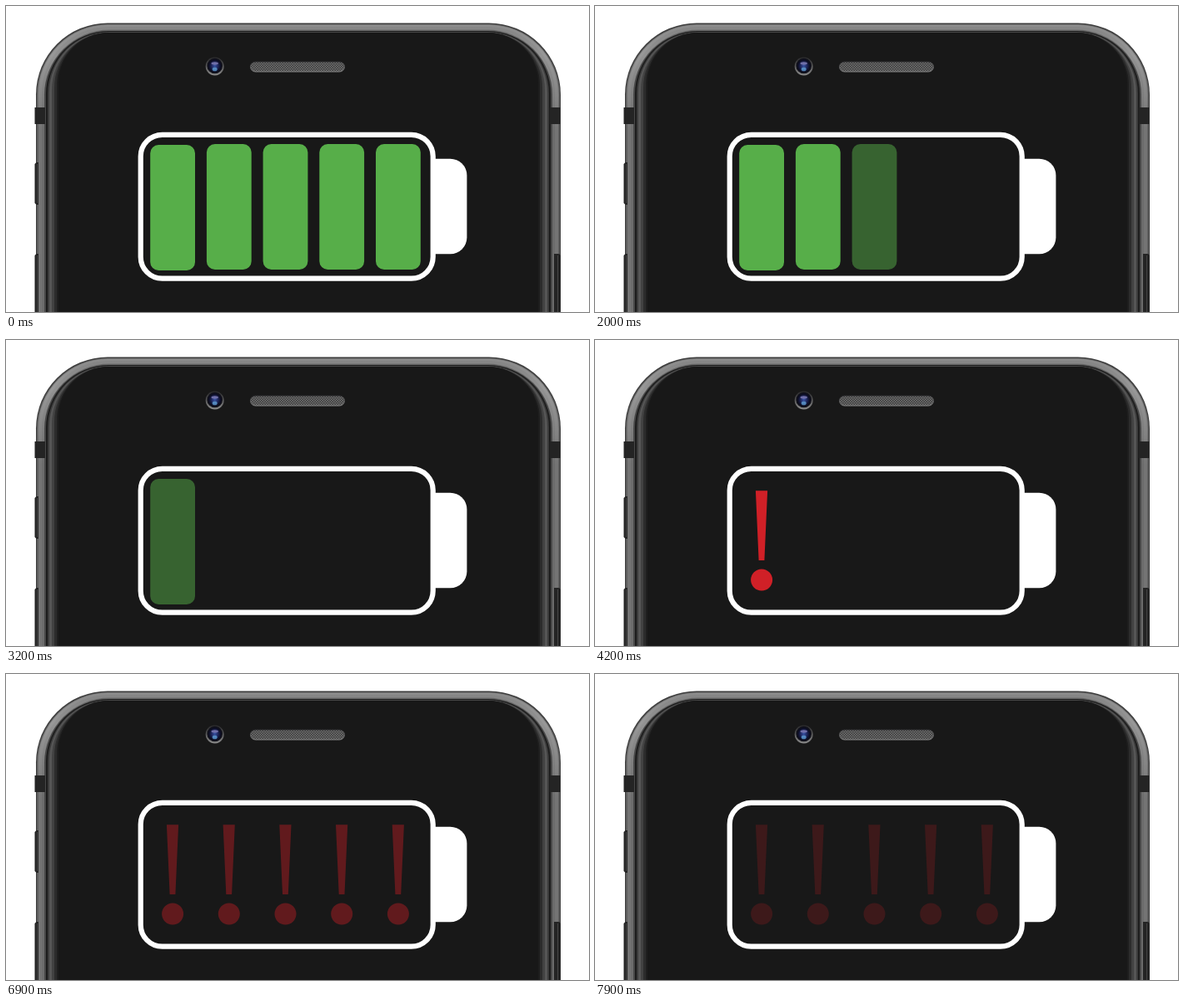
An HTML page for the animation above (8000 ms loop, 700 by 368 pixels).

```html
<!DOCTYPE html>
<html lang="en">
<head>
<meta charset="utf-8">
<title>Battery drain</title>
<style>
  html, body { margin: 0; width: 100%; height: 100%; overflow: hidden; background: #fff; }
  svg { display: block; width: 100%; height: 100%; }
</style>
</head>
<body>
<svg viewBox="0 0 700 368">
  <defs>
    <linearGradient id="shine" gradientUnits="userSpaceOnUse" x1="0" y1="21" x2="0" y2="150">
      <stop offset="0" stop-color="#fff" stop-opacity=".16"/>
      <stop offset=".3" stop-color="#fff" stop-opacity=".26"/>
      <stop offset="1" stop-color="#fff" stop-opacity="0"/>
    </linearGradient>
    <radialGradient id="lens">
      <stop offset="0" stop-color="#3a55a8"/>
      <stop offset=".4" stop-color="#20285f"/>
      <stop offset=".75" stop-color="#0c0d22"/>
      <stop offset="1" stop-color="#121216"/>
    </radialGradient>
    <linearGradient id="rim" x2="0" y2="1">
      <stop offset="0" stop-color="#28282a"/>
      <stop offset="1" stop-color="#8a8a8a"/>
    </linearGradient>
    <pattern id="mesh" width="3" height="3" patternUnits="userSpaceOnUse">
      <path d="M0 0h3v3H0z" fill="#747474"/>
      <path d="M0 0h1.500v1.500H0zM1.500 1.500H3V3H1.500z" fill="#383838"/>
    </pattern>
  </defs>

  <g id="phone"></g>

  <g fill="#242424">
    <path d="M34.500 122H47v20H34.500zM653 122h12.500v20H653z"/>
    <path d="M34.500 190l2-2H39v51h-2.500l-2-2zM34.500 300l2-2H39v70h-4.500zM658 298h6l2 2v68h-8z"/>
  </g>
  <path d="M37.500 190v47M37.500 300v68M662.500 300v68" stroke="#444"/>

  <circle cx="250.700" cy="72.500" r="11" fill="url(#rim)"/>
  <circle cx="250.700" cy="72" r="9.300" fill="url(#lens)"/>
  <ellipse cx="250.700" cy="69" rx="4.200" ry="1.700" fill="#8a86c0" opacity=".75"/>
  <ellipse cx="250.700" cy="76" rx="3" ry="2.300" fill="#5f9fd6" opacity=".8"/>

  <rect x="293.500" y="67" width="113" height="12" rx="6" fill="url(#mesh)" stroke="url(#rim)"/>

  <path d="M513 183.700h20.400a20 20 0 0 1 20 20v74.600a20 20 0 0 1-20 20H513z" fill="#fff"/>
  <rect x="161.700" y="154.800" width="351" height="172.900" rx="26" fill="#181818" stroke="#fff" stroke-width="6.200"/>
  <g id="bars" fill="#57ae49"></g>
  <g id="alerts" fill="#d02027"></g>
</svg>
<script>
const LOOP = 8000, STEP = 600, FRAME = 100, COUNT = 5, PITCH = 67.7;

function add(parentId, tag, attributes) {
  const node = document.createElementNS('http://www.w3.org/2000/svg', tag);
  for (const name in attributes) node.setAttribute(name, attributes[name]);
  return document.getElementById(parentId).appendChild(node);
}

function addShell(x, y, rx, fill, extra) {
  add('phone', 'rect', { x, y, rx, fill, width: 702 - 2 * x, height: 600, ...extra });
}

// Nested shells, outside in: side inset, top, corner radius, colour
const metal = [
  [36, 20.5, 86, '#3c3c3c'], [37, 22, 85, '#5e5e5e'], [39, 23, 83, '#747474'],
  [43, 25, 80, '#6c6c6c'], [46, 28.5, 78, '#484848'], [48, 30, 76, '#1c1c1c']
];
const glass = [
  [50, 31, 74, '#3c3c3c'], [52, 31.5, 72, '#565656'], [55, 32, 69, '#424242'],
  [58, 32, 66, '#2c2c2c'], [61, 32, 63, '#1e1e1e'], [63, 32, 61, '#181818']
];
for (const shell of metal) addShell(...shell);
addShell(42, 26, 81, 'none', { stroke: 'url(#shine)', 'stroke-width': 8 });
for (const shell of glass) addShell(...shell);

const bars = [], alerts = [];
for (let i = 0; i < COUNT; i++) {
  const y = i ? 166 : 167;
  bars.push(add('bars', 'rect', { x: 173.2 + i * PITCH, y, width: 53.8, height: 151, rx: 10 }));
  const x = 200.1 + i * PITCH;
  alerts.push(add('alerts', 'path', {
    d: `M${x - 7.2} 181.2h14.2l-3.7 83.7h-6.8z M${x - 13} 288.5a13 13 0 1 0 26 0a13 13 0 1 0-26 0z`
  }));
}

const progress = (t, start, duration) => Math.min(1, Math.max(0, (t - start) / duration));

// All alerts blink together: 500 ms out, 400 ms back in
function blink(t) {
  const phase = Math.max(0, t - 6600) % 900;
  return phase < 500 ? 1 - phase / 500 : (phase - 500) / 400;
}

function draw(now) {
  const t = Math.floor(now % LOOP / FRAME) * FRAME;
  for (let i = 0; i < COUNT; i++) {
    bars[i].setAttribute('opacity', 1 - progress(t, STEP * (COUNT - i), 400));
    alerts[i].setAttribute('opacity', progress(t, STEP * (6 + i), STEP) * blink(t));
  }
}

const start = performance.now();
function tick() {
  draw(performance.now() - start);
  requestAnimationFrame(tick);
}
tick();
</script>
</body>
</html>
```
